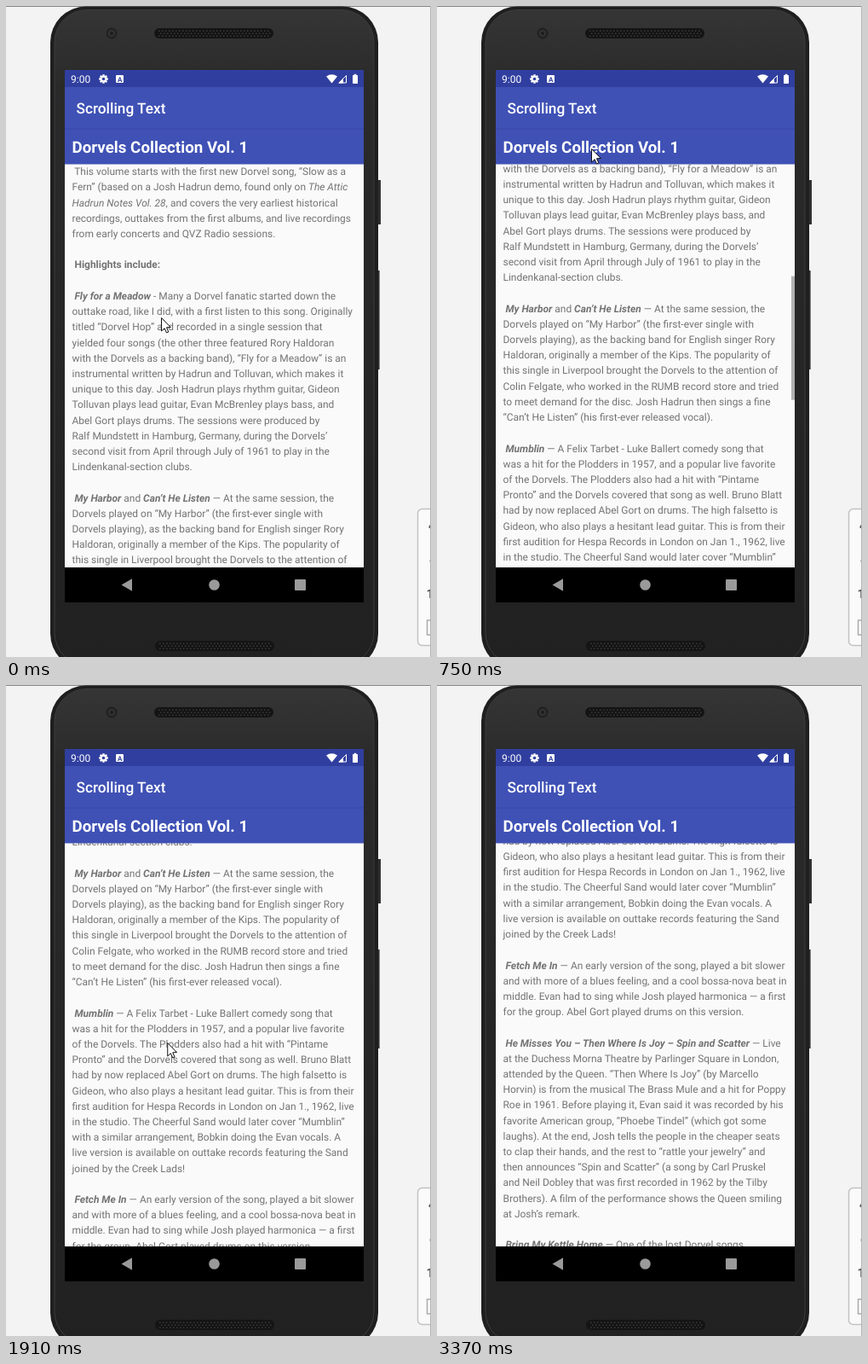
An HTML page with a canvas that plays this animation: 499x763 px, repeating every 3870 ms.

```html
<!DOCTYPE html>
<html lang="en">
<head>
<meta charset="utf-8">
<title>Scrolling Text</title>
<style>
html, body { margin: 0; width: 100%; height: 100%; overflow: hidden; background: #f3f3f3; }
canvas { display: block; }
</style>
</head>
<body>
<canvas id="stage" width="499" height="763"></canvas>
<script>
const ctx = document.getElementById('stage').getContext('2d');
const LOOP = 3870;
const PITCH = 18.21;
const VIEW = { x: 69, y: 185, w: 351, h: 473 };

// Each gesture runs in even steps, then its last pose is held.
const gestures = [
  { start: 0, end: 360, scroll: [0, 119], x: [182, 182], y: [365, 167] },
  { start: 500, end: 750, scroll: [119, 222], x: [182, 181], y: [279, 167] },
  { start: 1150, end: 1390, scroll: [232, 356], x: [180, 186], y: [196, 157] },
  { start: 1540, end: 2030, scroll: [356, 356], x: [181, 192], y: [230, 482] },
  { start: 2150, end: 2390, scroll: [640, 630.5], x: [221, 221], y: [145, 145] },
  { start: 2650, end: 3370, scroll: [630.5, 630.5], x: [273, 372], y: [590, 792] }
];

// * bold italic, _ italic, # bold
const styles = { '*': 'italic 700', '_': 'italic 400', '#': '700' };
const lines = ` This volume starts with the first new Dorvel song, “Slow as a
Fern” (based on a Josh Hadrun demo, found only on _The Attic_
_Hadrun Notes Vol. 28_, and covers the very earliest historical
recordings, outtakes from the first albums, and live recordings
from early concerts and QVZ Radio sessions.

# Highlights include:#

* Fly for a Meadow* - Many a Dorvel fanatic started down the
outtake road, like I did, with a first listen to this song. Originally
titled “Dorvel Hop” and recorded in a single session that
yielded four songs (the other three featured Rory Haldoran
with the Dorvels as a backing band), “Fly for a Meadow” is an
instrumental written by Hadrun and Tolluvan, which makes it
unique to this day. Josh Hadrun plays rhythm guitar, Gideon
Tolluvan plays lead guitar, Evan McBrenley plays bass, and
Abel Gort plays drums. The sessions were produced by
Ralf Mundstett in Hamburg, Germany, during the Dorvels’
second visit from April through July of 1961 to play in the
Lindenkanal-section clubs.

* My Harbor* and *Can’t He Listen* — At the same session, the
Dorvels played on “My Harbor” (the first-ever single with
Dorvels playing), as the backing band for English singer Rory
Haldoran, originally a member of the Kips. The popularity of
this single in Liverpool brought the Dorvels to the attention of
Colin Felgate, who worked in the RUMB record store and tried
to meet demand for the disc. Josh Hadrun then sings a fine
“Can’t He Listen” (his first-ever released vocal).

* Mumblin* — A Felix Tarbet - Luke Ballert comedy song that
was a hit for the Plodders in 1957, and a popular live favorite
of the Dorvels. The Plodders also had a hit with “Pintame
Pronto” and the Dorvels covered that song as well. Bruno Blatt
had by now replaced Abel Gort on drums. The high falsetto is
Gideon, who also plays a hesitant lead guitar. This is from their
first audition for Hespa Records in London on Jan 1., 1962, live
in the studio. The Cheerful Sand would later cover “Mumblin”
with a similar arrangement, Bobkin doing the Evan vocals. A
live version is available on outtake records featuring the Sand
joined by the Creek Lads!

* Fetch Me In* — An early version of the song, played a bit slower
and with more of a blues feeling, and a cool bossa-nova beat in
middle. Evan had to sing while Josh played harmonica — a first
for the group. Abel Gort played drums on this version.

* He Misses You – Then Where Is Joy – Spin and Scatter* — Live
at the Duchess Morna Theatre by Parlinger Square in London,
attended by the Queen. “Then Where Is Joy” (by Marcello
Horvin) is from the musical The Brass Mule and a hit for Poppy
Roe in 1961. Before playing it, Evan said it was recorded by his
favorite American group, “Phoebe Tindel” (which got some
laughs). At the end, Josh tells the people in the cheaper seats
to clap their hands, and the rest to “rattle your jewelry” and
then announces “Spin and Scatter” (a song by Carl Pruskel
and Neil Dobley that was first recorded in 1962 by the Tilby
Brothers). A film of the performance shows the Queen smiling
at Josh’s remark.

* Bring My Kettle Home* — One of the lost Dorvel songs`.split('\n');

function rect(x, y, w, h, color) {
  ctx.fillStyle = color;
  ctx.fillRect(x, y, w, h);
}

function round(x, y, w, h, r, fill, stroke) {
  ctx.beginPath();
  ctx.roundRect(x, y, w, h, r);
  ctx.fillStyle = fill;
  ctx.fill();
  if (stroke) {
    ctx.strokeStyle = stroke;
    ctx.stroke();
  }
}

function disc(x, y, r, color) {
  ctx.fillStyle = color;
  ctx.beginPath();
  ctx.arc(x, y, r, 0, 7);
  ctx.fill();
}

function poly(points, color) {
  ctx.beginPath();
  points.forEach(([x, y]) => ctx.lineTo(x, y));
  ctx.closePath();
  ctx.fillStyle = color;
  ctx.fill();
}

function text(str, x, y, weight, size, color) {
  ctx.font = `${weight} ${size}px Roboto, sans-serif`;
  ctx.fillStyle = color;
  ctx.fillText(str, x, y);
  return ctx.measureText(str).width;
}

function speaker(x, y) {
  round(x, y, 140, 12, 6, '#141414');
  for (let row = 0; row < 3; row++) {
    for (let i = 0; i < 33; i++) {
      rect(x + 5 + i * 4 + (row % 2) * 2, y + 2.5 + row * 3, 1.5, 1.5, '#3a3a3a');
    }
  }
}

function drawPanel() {
  ctx.lineWidth = 1.5;
  round(483.5, 589.5, 40, 160, 5, '#fafafa', '#c2c2c2');
  poly([[499, 606], [496, 611], [499, 613]], '#555');
  rect(497, 649, 2, 3, '#c8c8c8');
  text('1', 493.5, 694, 700, 15, '#555');
  ctx.strokeStyle = '#aaa';
  ctx.strokeRect(494.5, 720, 20, 17);
  rect(498, 0, 1, 763, '#b4b4b4');
}

function drawPhone() {
  rect(436, 204, 4, 52, '#303030');
  rect(436, 310, 2.6, 116, '#303030');
  round(52, 0.5, 385, 777, 42, '#1f1f1f');
  const face = ctx.createLinearGradient(0, 4, 0, 763);
  face.addColorStop(0, '#353535');
  face.addColorStop(0.12, '#2a2a2a');
  face.addColorStop(1, '#212121');
  ctx.lineWidth = 1;
  round(57, 4.5, 375, 768, 38, face, '#3c3c3c');
  disc(124, 32, 6.5, '#212121');
  disc(124, 32, 4, '#333');
  disc(124, 32, 2, '#1c1c1c');
  speaker(174, 26);
  speaker(175, 744);
}

function drawStatus() {
  const blue = '#303f9f';
  rect(69, 75, 351, 20, blue);
  text('9:00', 76, 90, 400, 12, '#fff');

  for (let i = 0; i < 4; i++) {
    ctx.save();
    ctx.translate(114.5, 85.5);
    ctx.rotate(i * Math.PI / 4);
    rect(-1.2, -5.3, 2.4, 10.6, '#fff');
    ctx.restore();
  }
  disc(114.5, 85.5, 4, '#fff');
  disc(114.5, 85.5, 1.8, blue);

  round(129, 81, 9, 9, 1, '#fff');
  text('A', 130.9, 88.5, 700, 8, blue);

  ctx.beginPath();
  ctx.moveTo(382.5, 90.5);
  ctx.lineTo(376, 82.5);
  ctx.quadraticCurveTo(382.5, 78, 389, 82.5);
  ctx.fillStyle = '#fff';
  ctx.fill();

  poly([[391, 90], [399.5, 90], [399.5, 81.5]], blue);
  ctx.strokeStyle = '#fff';
  ctx.lineWidth = 1;
  ctx.stroke();
  poly([[390, 90.5], [396, 90.5], [396, 84.5]], '#fff');

  round(407, 81, 6, 10, 0.8, '#fff');
  rect(408.7, 79.8, 2.6, 1.5, '#fff');
}

function drawBars() {
  drawStatus();
  rect(69, 95, 351, 90.5, '#3f51b5');
  rect(69, 143.5, 351, 1, '#3849a6');
  text('Scrolling Text', 82.5, 126, 500, 17.3, '#fff');
  text('Dorvels Collection Vol. 1', 77.5, 172, 700, 18.75, '#fff');

  const gray = '#9a9a9a';
  rect(69, 658, 351, 41, '#000');
  poly([[135.5, 678.5], [148, 671.3], [148, 685.7]], gray);
  disc(244.5, 678.5, 6.3, gray);
  round(339, 672, 13, 13, 1, gray);
}

function drawLine(line, y) {
  let x = 77.5;
  let style = '';
  for (const part of line.split(/([*_#])/)) {
    if (styles[part]) style = style === part ? '' : part;
    else if (part) x += text(part, x, y, styles[style] || '400', 11.96, '#737373');
  }
}

function drawArticle(scroll, bar) {
  rect(VIEW.x, VIEW.y, VIEW.w, VIEW.h, '#fafafa');
  ctx.save();
  ctx.beginPath();
  ctx.rect(VIEW.x, VIEW.y, VIEW.w, VIEW.h);
  ctx.clip();
  lines.forEach((line, i) => {
    const y = 198.2 + i * PITCH - scroll;
    if (y > VIEW.y - 6 && y < VIEW.y + VIEW.h + 14) drawLine(line, y);
  });
  ctx.globalAlpha = bar;
  rect(416, 248.5 + scroll * 0.307, 4, 145, '#b2b2b2');
  ctx.restore();
}

function drawCursor(x, y) {
  ctx.save();
  ctx.translate(x + 0.5, y + 0.5);
  poly([[0, 0], [0, 15.5], [3.6, 12.2], [6, 17.5], [8.3, 16.5], [6, 11.3], [10.8, 11]], '#fff');
  ctx.strokeStyle = '#111';
  ctx.lineWidth = 1;
  ctx.stroke();
  ctx.restore();
}

// The scrollbar appears with the first movement and fades while the text rests.
function barOpacity(move, scroll, step) {
  if (scroll === 0) return 0;
  const resting = move.scroll[0] === move.scroll[1];
  return resting ? Math.max(0, 1 - step / 2) : 1;
}

function poseAt(time) {
  const move = gestures.findLast(g => g.start <= time);
  const span = move.end - move.start;
  const count = Math.round(span / 122);
  const step = Math.min(count, Math.floor((time - move.start) * count / span));
  const mix = ([a, b]) => a + (b - a) * step / count;
  const scroll = mix(move.scroll);
  return { scroll, x: mix(move.x), y: mix(move.y), bar: barOpacity(move, scroll, step) };
}

function draw(time) {
  const pose = poseAt(time);
  rect(0, 0, 499, 763, '#f3f3f3');
  rect(0, 0, 499, 1, '#858585');
  drawPanel();
  drawPhone();
  drawArticle(pose.scroll, pose.bar);
  drawBars();
  drawCursor(pose.x, pose.y);
}

ctx.textRendering = 'geometricPrecision';
let start;
function tick(now) {
  start ??= now;
  draw((now - start) % LOOP);
  requestAnimationFrame(tick);
}
requestAnimationFrame(tick);
</script>
</body>
</html>
```
